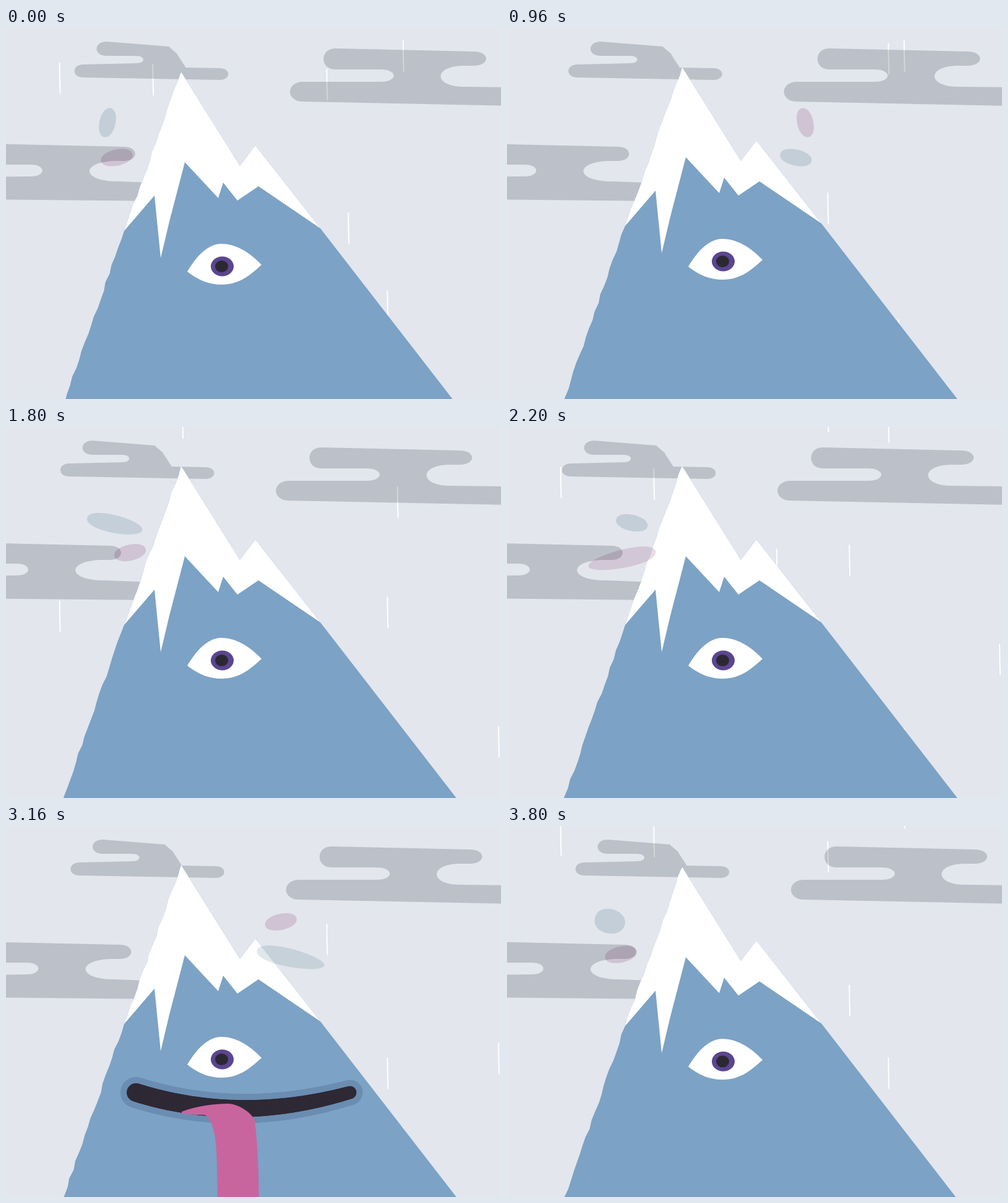
An HTML page with a canvas that plays this animation: 800 px wide and 600 px high, repeating every 3.84 s.

```html
<!DOCTYPE html>
<html lang="en">
<head>
<meta charset="utf-8">
<title>Mountain</title>
<style>
  html, body { margin: 0; width: 100%; height: 100%; overflow: hidden; background: #e3e6ed; }
  canvas { display: block; }
</style>
</head>
<body>
<canvas id="stage" width="800" height="600"></canvas>
<script>
const ctx = document.getElementById('stage').getContext('2d');
const LOOP = 3840, STEP = 40, ORBIT = 1920, TAU = 2 * Math.PI;

const clamp = v => Math.max(0, Math.min(1, v));
const ease = v => (v = clamp(v), v * v * (3 - 2 * v));
const lerp = (a, b, u) => a + (b - a) * u;
const mod = (a, n) => ((a % n) + n) % n;
const pulse = (t, in0, in1, out0, out1) => ease((t - in0) / (in1 - in0)) * (1 - ease((t - out0) / (out1 - out0)));
const random = seed => mod(Math.sin(seed * 12.9898 + 4.1) * 43758.5453, 1);

function fill(path, color) {
  ctx.fillStyle = color;
  ctx.fill(path);
}

function ellipse(x, y, rx, ry, color) {
  const path = new Path2D();
  path.ellipse(x, y, rx, ry, 0, 0, TAU);
  fill(path, color);
}

function polygon(points, color) {
  const path = new Path2D();
  for (const [x, y] of points) path.lineTo(x, y);
  fill(path, color);
}

// A cloud runs clockwise through rounded ends: x, from y, to y, bulge
function cloud(...ends) {
  const path = new Path2D();
  for (const [x, y0, y1, bulge] of ends) {
    path.lineTo(x, y0);
    path.bezierCurveTo(x + bulge, y0, x + bulge, y1, x, y1);
  }
  return path;
}

const clouds = [
  cloud([264, 30, 31, 0], [277, 42, 43, 0], [290, 63, 64, 0], [345, 65, 84, 19],
    [125, 80, 59, -19], [210, 57, 45, 16], [163, 45, 22, -22]),
  cloud([755, 38, 61, 28], [740, 61, 95, -50], [830, 96, 126, 0],
    [480, 119, 87, -28], [605, 87, 67, 29], [532, 67, 33, -25]),
  cloud([190, 192, 215, 25], [180, 215, 248, -60], [260, 251, 280, 0],
    [-40, 277, 241, 0], [40, 240, 221, 25], [-40, 221, 187, 0])
];

const peak = [283, 64], shoulder = [191, 321], base = [79, 640];
const ridge = [peak, [378, 216], [403, 183], [508, 317]];
const snowLine = [[408, 249], [374, 272], [351, 243], [343, 268], [289, 210], [264, 306], [250, 365], [240, 264]];
const eye = new Path2D('M293 387C306 365 325 342 348 342C375 342 398 360 413 376C395 392 378 408 348 408C330 408 312 402 293 387Z');
const tongue = new Path2D('M284 463C310 453 340 450 360 450C380 452 400 468 402 478C407 520 409 560 409 650' +
  'C409 690 342 690 342 650C342 560 341 520 337 500C333 480 328 468 317 468C305 468 290 468 284 465Z');

// Hand-cut edge from a to b that trembles with the boil
function roughEdge(a, b, boil) {
  const n = Math.round(Math.abs(b[1] - a[1]) / 14);
  return Array.from({ length: n }, (_, i) => {
    const wobble = i ? 3 * (random(i + a[0] + boil * 7.3) - 0.5) : 0;
    return [lerp(a[0], b[0], i / n) + wobble, lerp(a[1], b[1], i / n)];
  });
}

function drawRain(t) {
  ctx.strokeStyle = '#fff';
  ctx.lineWidth = 2;
  ctx.lineCap = 'round';
  for (let i = 1; i <= 12; i++) {
    const falls = 5 + i % 4, x = 800 * random(i);
    const y = 800 * mod(random(i + 50) + falls * t / LOOP, 1) - 100;
    ctx.beginPath();
    ctx.moveTo(x, y);
    ctx.quadraticCurveTo(x, y + 25, x + 1, y + 49);
    ctx.stroke();
  }
}

function drawClouds(t) {
  ctx.save();
  ctx.globalCompositeOperation = 'multiply';
  ctx.translate(-11.5 * (1 - Math.cos(TAU * t / LOOP)), 0);
  for (const path of clouds) fill(path, '#d4d5d7');
  ctx.restore();
}

// Wisps circle the peak on tilted orbits, stretched into a drop in front of it
function wisp(t, start, side, color) {
  const phase = TAU * mod(t - start, ORBIT) / ORBIT;
  const angle = phase - 0.175 * (1 - Math.cos(phase));
  const c = Math.cos(angle), near = -Math.sin(angle), front = Math.max(0, near);
  const swing = c * (1.25 - 0.25 * c * c);
  const heading = near < 0 ? -side : side;
  const turn = Math.min(1, Math.abs(near) * 3);

  const draw = () => {
    const a = lerp(26, 52, turn) / 2 + 50 * front;
    const b = lerp(48, 26, turn) / 2 + 8 * front;
    const tail = 1.33 * b * (1 - 0.6 * front), head = 1.33 * b;
    const path = new Path2D();
    path.moveTo(-a, 0);
    path.bezierCurveTo(-a, -tail, a, -head, a, 0);
    path.bezierCurveTo(a, head, -a, tail, -a, 0);
    ctx.save();
    ctx.globalCompositeOperation = 'multiply';
    ctx.globalAlpha = 1 - 0.15 * front;
    ctx.translate(323 + 5 * side + side * 154 * swing - heading * 12 * front, 183 - 30 * swing + 7 * near);
    ctx.rotate(-side * 0.22);
    ctx.scale(heading, 1);
    fill(path, color);
    ctx.restore();
  };
  return { near, draw };
}

function drawMouth(open) {
  if (open < 0.02) return;
  const band = (pad, color) => {
    for (let i = 0; i <= 120; i++) {
      const u = i / 120, w = 1 - u;
      const x = 210 * w * w + 750 * u * w + 556 * u * u;
      const y = 432 * (w * w + u * u) + 968 * u * w + 14 * (open - 1);
      const r = open * (15 - 4.5 * u * u + pad);
      ellipse(x, y, r, r, color);
    }
  };
  band(10, '#6a8db1');
  band(0, '#2e2935');
}

function drawTongue(out) {
  if (out < 0.02) return;
  ctx.save();
  ctx.translate(0, 451 * (1 - out));
  ctx.scale(1, out);
  fill(tongue, '#c8659f');
  ctx.restore();
}

function drawMountain(t) {
  const boil = Math.floor(t / 120);
  const dip = 16 * Math.sin(Math.PI * clamp(mod(t + 100, LOOP) / 400)) ** 2;
  const slope = roughEdge(shoulder, peak, boil);
  ctx.save();
  ctx.translate(0, dip - 1);
  polygon([...ridge, [758, 640], ...roughEdge(base, shoulder, boil), ...slope], '#7ca2c5');
  polygon([...ridge, ...snowLine, ...slope], '#fff');
  fill(eye, '#fff');
  ellipse(349.5, 378.5, 18.5, 16, '#5b4590');
  ellipse(348.5, 378.5, 10.5, 9.5, '#2c2833');
  drawMouth(pulse(t, 2480, 2710, 3500, 3700));
  drawTongue(pulse(t, 2720, 2960, 3340, 3540));
  ctx.restore();
}

function draw(t) {
  const wisps = [wisp(t, 0, -1, '#dbe5e9'), wisp(t, ORBIT / 2, 1, '#e9d9e4')];
  ctx.fillStyle = '#e3e6ed';
  ctx.fillRect(0, 0, 800, 600);
  drawRain(t);
  drawClouds(t);
  for (const w of wisps) if (w.near < 0) w.draw();
  drawMountain(t);
  for (const w of wisps) if (w.near >= 0) w.draw();
}

function frame() {
  const t = performance.now() % LOOP;
  draw(Math.floor(t / STEP) * STEP);
  requestAnimationFrame(frame);
}
frame();
</script>
</body>
</html>
```
